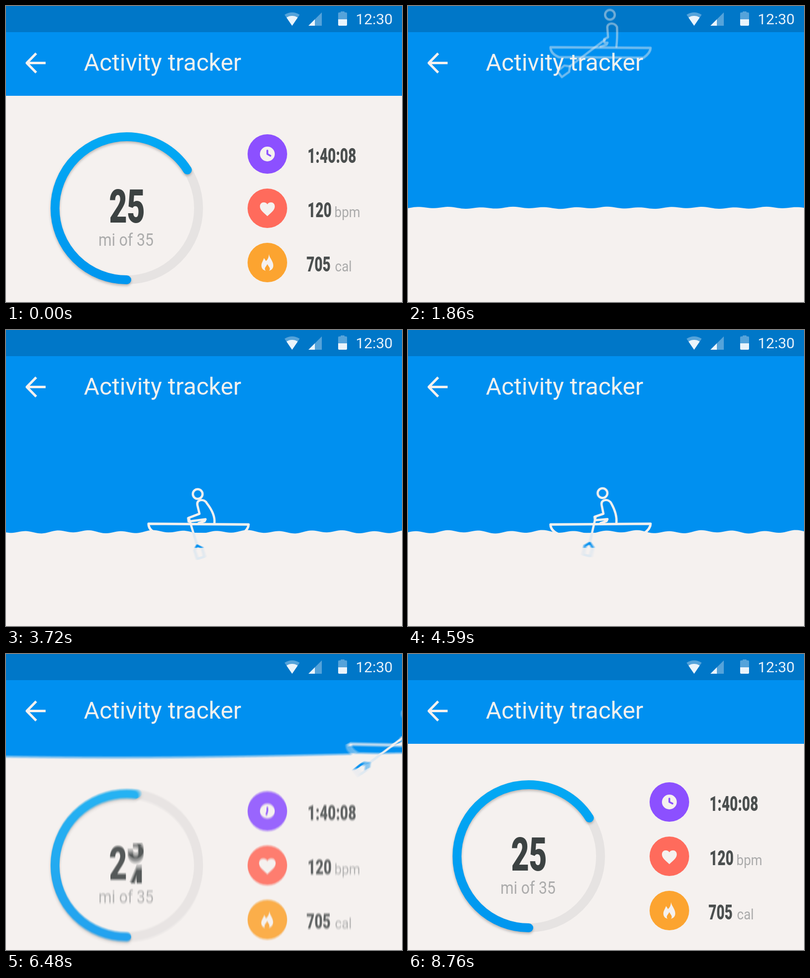
Recreate the animation shown at these times as an HTML page with a canvas. Size 800x600 px, loop 8790 ms.

```html
<!DOCTYPE html>
<html lang="en">
<head>
<meta charset="utf-8">
<title>Activity tracker</title>
<style>
  html, body { margin: 0; width: 100%; height: 100%; overflow: hidden; background: #f5f1ef; }
  canvas { display: block; width: 800px; height: 600px; }
</style>
</head>
<body>
<canvas id="stage" width="800" height="600"></canvas>
<script>
const W = 800, H = 600, LOOP = 8790, STEP = 30, SHUTTER = 26, SAMPLES = 8, TAU = Math.PI * 2;
const PAPER = '#f5f1ef', BLUE = '#0090f0', PALE = '#dfe9f1', GREY = '#ababab', DARK = '#4b4f4f';
const SEA = 227; // distance the panel edge drops
const NARROW = 0.87, SLIM = 0.67; // condensed faces

function makeLayer() {
  const canvas = document.createElement('canvas');
  canvas.width = W;
  canvas.height = H;
  return canvas.getContext('2d');
}

const out = document.getElementById('stage').getContext('2d');
const scene = makeLayer(), stats = makeLayer();
let c = scene; // layer being drawn

const clamp = (v, a = 0, b = 1) => Math.min(b, Math.max(a, v));
const ramp = (t, a, b) => clamp((t - a) / (b - a));
const ease = u => u < 0.5 ? 4 * u ** 3 : 1 - 4 * (1 - u) ** 3;

// Piecewise linear lookup in [time, value] pairs
function track(points, t) {
  for (let i = 1; i < points.length; i++) {
    const [t0, v0] = points[i - 1], [t1, v1] = points[i];
    if (t <= t1) return v0 + (v1 - v0) * ramp(t, t0, t1);
  }
  return points[points.length - 1][1];
}

const drop = t => SEA * (ease(ramp(t, 864, 1806)) - ease(ramp(t, 5862, 6712)));

const rowPhase = t => t > 6480 ? 3 + (t - 6480) / 1080
  : track([[2715, 0], [2820, 0.07], [4590, 1.25], [5940, 2.5], [6480, 3]], t);

function text(str, x, y, size, color, { weight = 400, squeeze = 1, align = 'left' } = {}) {
  c.save();
  c.translate(x, y);
  c.scale(squeeze, 1);
  c.font = `${weight} ${size}px Roboto, sans-serif`;
  c.textAlign = align;
  c.fillStyle = color;
  c.fillText(str, 0, 0);
  c.restore();
}

function disc(x, y, r, color) {
  c.fillStyle = color;
  c.beginPath();
  c.arc(x, y, r, 0, TAU);
  c.fill();
}

function shape(points, color) {
  c.fillStyle = color;
  c.beginPath();
  points.forEach(p => c.lineTo(...p));
  c.fill();
}

function line(points, color, width, closed = false) {
  c.strokeStyle = color;
  c.lineWidth = width;
  c.beginPath();
  points.forEach(p => c.lineTo(...p));
  if (closed) c.closePath();
  c.stroke();
}

function box(x, y, w, h, r, color) {
  c.fillStyle = color;
  c.beginPath();
  c.roundRect(x, y, w, h, r);
  c.fill();
}

function fan(r, color) {
  c.fillStyle = color;
  c.beginPath();
  c.moveTo(578, 40);
  c.arc(578, 40, r, -Math.PI / 2 - 0.6, -Math.PI / 2 + 0.6);
  c.fill();
}

function drawBars() {
  const dim = '#55a3da', lit = '#eaf4fb';
  c.fillStyle = '#0077c8';
  c.fillRect(0, 0, W, 53);
  fan(27, dim);
  fan(20, lit);
  shape([[611, 40], [638, 40], [638, 13]], dim);
  shape([[611, 40], [624, 40], [624, 27]], lit);
  box(676, 11, 8, 4, 1, dim);
  box(671, 13, 18, 15, [2, 2, 0, 0], dim);
  box(671, 27, 18, 13, [0, 0, 2, 2], lit);
  text('12:30', 706.5, 37, 30, '#e8f2fa');
  line([[80, 115.5], [43, 115.5]], PAPER, 5);
  line([[61, 96], [42, 115.5], [61, 135]], PAPER, 5);
  text('Activity tracker', 157.3, 131, 48.2, PAPER);
}

function edgePath(t) {
  const leaving = t > 4000;
  const swell = ramp(t, 1450, 2100) * (1 - ramp(t, 5960, 6380))
    + 0.2 * ramp(t, 6700, 7000) * (1 - ramp(t, 7000, 8000));
  const shift = (t - 5940) * 0.0455;
  const path = new Path2D();
  for (let x = 0; x <= W; x += 4) {
    const lag = leaving ? 34 * Math.sin(Math.PI * (x + 350) / 1150) : 29 + 37 * Math.cos(Math.PI * x / W);
    const ripple = 2.4 * Math.cos(TAU * (x - 13 - shift) / 64) + 1.2 * Math.cos(TAU * (x - 40 + shift) / 171);
    path.lineTo(x, 182 + drop(t - lag) - swell * ripple);
  }
  path.lineTo(W, H);
  path.lineTo(0, H);
  path.closePath();
  return path;
}

const HEART = new Path2D('M0 14C-10 5-15 1-15-6C-15-11-11.5-14-7.5-14C-4-14-1.5-12.5 0-10C1.5-12.5 4-14 7.5-14C11.5-14 15-11 15-6C15 1 10 5 0 14Z');
const FLAME = new Path2D('M3-17C5-8 12-3 12 6C12 13 7 17 0 17C-7 17-12 13-12 6C-12 0-8-4-7-9C-5-7-4-5-3-3C1-6 3-11 3-17Z');
const CORE = new Path2D('M0 3C2 8 5 9 5 13C5 16 3 17.5 0 17.5C-3 17.5-5 16-5 13C-5 9-2 8 0 3Z');

function drawIcons(t) {
  disc(528, 300, 40, '#8c50ff');
  disc(528, 300, 15, PAPER);
  const a = TAU * (120 / 360 + 3 * t / LOOP);
  line([[528, 293], [528, 300], [528 + 7 * Math.sin(a), 300 - 7 * Math.cos(a)]], '#8c50ff', 3.6);

  disc(528, 410, 40, '#ff6b5c');
  c.save();
  c.translate(528, 412);
  const beat = 1 + 0.065 * (1 - Math.cos(TAU * 6 * t / LOOP));
  c.scale(beat, beat);
  c.fillStyle = PAPER;
  c.fill(HEART);
  c.restore();

  disc(528, 520, 40, '#fca430');
  c.save();
  c.translate(528, 520);
  c.transform(1, 0, 0.08 * Math.sin(TAU * 9 * t / LOOP), 1, 0, 0);
  c.fillStyle = PAPER;
  c.fill(FLAME);
  c.fillStyle = '#fca430';
  c.fill(CORE);
  c.restore();
}

function drawRing(t) {
  const angle = t < 4000
    ? 237.6 - 24.6 * (Math.max(0, t - 900) / 360) ** 2
    : 237.6 - 50.6 * (Math.max(0, 7160 - t) / 680) ** 2;
  c.lineWidth = 18;
  c.strokeStyle = '#e6e3e2';
  c.beginPath();
  c.arc(244, 410, 145, 0, TAU);
  c.stroke();

  c.save();
  const tint = c.createLinearGradient(0, 256, 0, 564);
  tint.addColorStop(0, '#03a9f4');
  tint.addColorStop(1, '#0096ef');
  c.strokeStyle = tint;
  c.shadowColor = 'rgba(0,0,0,.25)';
  c.shadowBlur = 5;
  c.shadowOffsetY = 3;
  c.beginPath();
  c.arc(244, 410, 145, Math.PI / 2, Math.PI / 2 + Math.max(0.5, angle) * TAU / 360);
  c.stroke();
  c.restore();
}

function drawCount(t) {
  const face = { weight: 900, squeeze: SLIM, align: 'center' };
  const value = t < 4000 ? 25 : Math.max(20, 25 - 1.52 * (Math.max(0, 7160 - t) / 680) ** 2);
  text('2', 226.5, 439, 94, '#3c4242', face);
  c.save();
  c.beginPath();
  c.rect(240, 366, 48, 80);
  c.clip();
  for (let n = Math.floor(value); n <= Math.ceil(value); n++) {
    text(String(n % 10), 262.5, 439 + (n - value) * 81, 94, '#3c4242', face);
  }
  c.restore();
  text('mi of 35', 242.5, 486, 35, GREY, { squeeze: NARROW, align: 'center' });
}

function drawLabels() {
  const bold = { weight: 900, squeeze: SLIM }, unit = { squeeze: NARROW };
  text('1:40:08', 609, 318, 42, DARK, bold);
  text('120', 609, 428, 42, DARK, bold);
  text('bpm', 663.5, 428, 30, GREY, unit);
  text('705', 607, 538, 42, DARK, bold);
  text('cal', 664.5, 538, 30, GREY, unit);
}

// Drawn on its own layer so that it fades as one
function drawStats(t) {
  const falling = t < 4000;
  const alpha = falling ? 1 - 1.3 * ramp(t, 864, 1806) ** 2 : ramp(t, 6000, 6565);
  if (alpha <= 0) return;
  const lead = falling ? drop(t + 18) - drop(t) : 0;
  c = stats;
  c.clearRect(0, 0, W, H);
  c.lineCap = c.lineJoin = 'round';
  drawRing(t);
  drawCount(t);
  drawIcons(t);
  c.save();
  c.translate(0, lead);
  drawLabels();
  c.restore();
  c = scene;
  c.globalAlpha = alpha;
  c.drawImage(stats.canvas, 0, drop(t));
  c.globalAlpha = 1;
}

function boatPose(t) {
  const phase = rowPhase(t), s = Math.cos(TAU * phase);
  const sail = Math.max(0, t - 5374);
  const x = 389 + 0.446 * (sail < 400 ? sail * sail / 800 : sail - 200);
  const landed = Math.max(0, t - 2250);
  const fall = -311 * (1 - ramp(t, 1830, 2250) ** 2);
  const bob = 9 * Math.exp(-landed / 180) * Math.sin(TAU * landed / 420);
  return {
    x, y: 393.5 + drop(t) - SEA + fall + bob, s,
    tilt: (0.5 + 0.9 * Math.cos(TAU * (t - 2820) / 3540)) * TAU / 360,
    alpha: ramp(t, 1800, 1930),
    hand: [-10 + 19 * s, -14 + 2 * Math.abs(s) - 4 * s],
    tip: [-22 - 40 * s, 38 + 6 * Math.max(0, -Math.sin(TAU * phase))]
  };
}

function drawOar(p, shaft, blade) {
  const [hx, hy] = p.hand, [tx, ty] = p.tip;
  const len = Math.hypot(tx - hx, ty - hy);
  const ux = (tx - hx) / len, uy = (ty - hy) / len;
  const at = (u, v) => [tx + u * ux - v * uy, ty + u * uy + v * ux];
  c.save();
  c.translate(p.x, p.y);
  line([p.hand, p.tip], shaft, 4.5);
  line([[0, 0], [8, 8], [26, 7.5], [26, -7.5], [8, -8]].map(q => at(...q)), blade, 4.5, true);
  c.restore();
}

function drawBoat(p) {
  const { s } = p, [hx, hy] = p.hand;
  c.save();
  c.translate(p.x, p.y);
  c.rotate(p.tilt);
  c.strokeStyle = PAPER;
  c.lineWidth = 5;

  // hull
  c.beginPath();
  c.moveTo(-101, 0);
  c.lineTo(101, 0);
  c.quadraticCurveTo(101, 10, 87, 20);
  c.lineTo(-84, 20);
  c.quadraticCurveTo(-101, 13, -101, 0);
  c.closePath();
  c.stroke();

  // head
  c.lineWidth = 4.6;
  c.beginPath();
  c.arc(4.5 + 14 * s, -62.8 - 3.8 * s, 9.8, 0, TAU);
  c.stroke();

  // body and arms
  const front = 2.5 + 11 * s, back = 22 + 11 * s;
  c.beginPath();
  c.moveTo(32, -2);
  c.quadraticCurveTo(34, -20, back, -42);
  c.bezierCurveTo(back - 5, -52, front - 2, -51, front, -39);
  c.lineTo(6 + 9 * s, -21);
  c.lineTo(hx - 2, hy - 1);
  c.lineTo(hx - 1, hy + 6);
  c.lineTo(14, -10);
  c.lineTo(12, -6);
  c.lineTo(0, -2);
  c.stroke();
  c.restore();
}

function drawScene(t) {
  const edge = edgePath(t);
  const afloat = t > 1830 && t < 6950;
  const p = boatPose(t);
  c.fillStyle = BLUE;
  c.fillRect(0, 0, W, H);
  c.lineJoin = 'round';
  c.lineCap = 'butt';
  drawBars();
  c.lineCap = 'round';

  if (afloat) {
    c.globalAlpha = p.alpha;
    drawBoat(p);
    drawOar(p, PAPER, PAPER);
    c.globalAlpha = 1;
  }
  c.fillStyle = PAPER;
  c.fill(edge);
  drawStats(t);
  if (afloat) {
    const depth = c.createLinearGradient(0, 47, 0, 49);
    depth.addColorStop(0, BLUE);
    depth.addColorStop(1, PALE);
    c.save();
    c.clip(edge);
    drawOar(p, PALE, depth);
    c.restore();
  }
}

// Averages several moments of one step as motion blur
function render(t) {
  const count = t < 880 || t > 8100 ? 1 : SAMPLES;
  for (let i = 0; i < count; i++) {
    drawScene(t + ((i + 0.5) / count - 0.5) * SHUTTER);
    out.globalAlpha = 1 / (i + 1);
    out.drawImage(scene.canvas, 0, 0);
  }
}

const start = performance.now();
let shown = -1;
function tick() {
  const t = Math.floor((performance.now() - start) % LOOP / STEP) * STEP;
  if (t !== shown) render(shown = t);
  requestAnimationFrame(tick);
}
tick();
</script>
</body>
</html>
```
